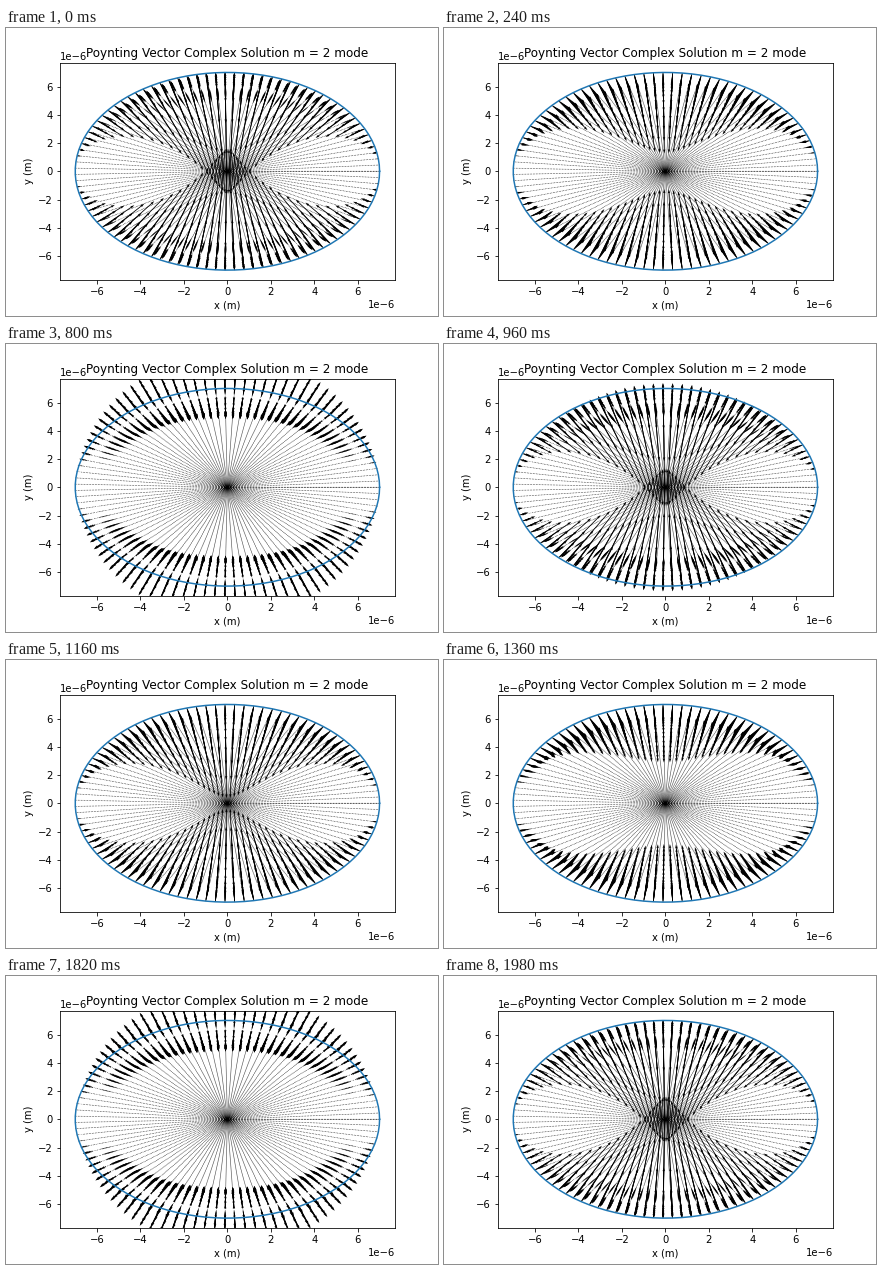
A matplotlib script that plays this animation: 432 px wide and 288 px high, repeating every 2 s.

```python
import numpy as np
import matplotlib.pyplot as plt
from matplotlib.animation import FuncAnimation
from matplotlib.collections import PathCollection
from matplotlib.path import Path

FRAMES = 100
N = 100              # grid points along r and phi
R = 7e-6             # cylinder radius (m)
LIM = 1.1 * R
DECAY = 0.055 * R    # decay length of the power below the surface
PHASE = np.radians(99.5)
CORE = 62            # radial points that never carry a visible arrow
WIDTH = 0.0024       # shaft width as a fraction of the axes width

r = np.linspace(0, R, N)
phi = np.linspace(0, 2 * np.pi, N)
depth = (R - r) / DECAY
lobe = np.sin(phi) ** 2
X = np.outer(np.cos(phi), r)
Y = np.outer(np.sin(phi), r)


def radial_flux(frame):
    """Radial power flow of a damped wave, scaled to a mean size of one."""
    psi = PHASE + 4 * np.pi * frame / (FRAMES - 1)
    wave = np.exp(-depth) * (np.cos(psi - depth) - np.sqrt(0.5))
    s = np.outer(lobe, wave)
    return s / np.abs(s).mean()


def components(frame):
    s = radial_flux(frame)[:, CORE:]
    return s * np.cos(phi)[:, None], s * np.sin(phi)[:, None]


def core_dots(ax):
    """One compound path of small hexagons for each spoke."""
    box = ax.get_window_extent()
    th = np.arange(7) * np.pi / 3
    rx = WIDTH * LIM
    ry = rx * box.width / box.height
    hexagon = np.column_stack([rx * np.cos(th), ry * np.sin(th)])
    centres = np.stack([X, Y], axis=-1)[:, :CORE, None, :]
    spokes = [Path.make_compound_path_from_polys(p) for p in centres + hexagon]
    return PathCollection(spokes, facecolors="k", linewidths=0,
                          transform=ax.transData)


fig, ax = plt.subplots(figsize=(6, 4), dpi=72)
fig.subplots_adjust(left=0.125, right=0.9, bottom=0.125, top=0.88)
ax.plot(R * np.cos(phi), R * np.sin(phi))
ax.set_xlim(-LIM, LIM)
ax.set_ylim(-LIM, LIM)
ax.set_xlabel("x (m)")
ax.set_ylabel("y (m)")
ax.set_title("Poynting Vector Complex Solution m = 2 mode", y=1.0)

ax.add_collection(core_dots(ax), autolim=False)
arrows = ax.quiver(X[:, CORE:], Y[:, CORE:], *components(0),
                   scale=1.8 * N, width=WIDTH, units="width")
ax.set_xlim(-LIM, LIM)
ax.set_ylim(-LIM, LIM)


def update(frame):
    arrows.set_UVC(*components(frame))
    return arrows,


anim = FuncAnimation(fig, update, frames=FRAMES, interval=20,
                     repeat=True, repeat_delay=0)
plt.show()
```
